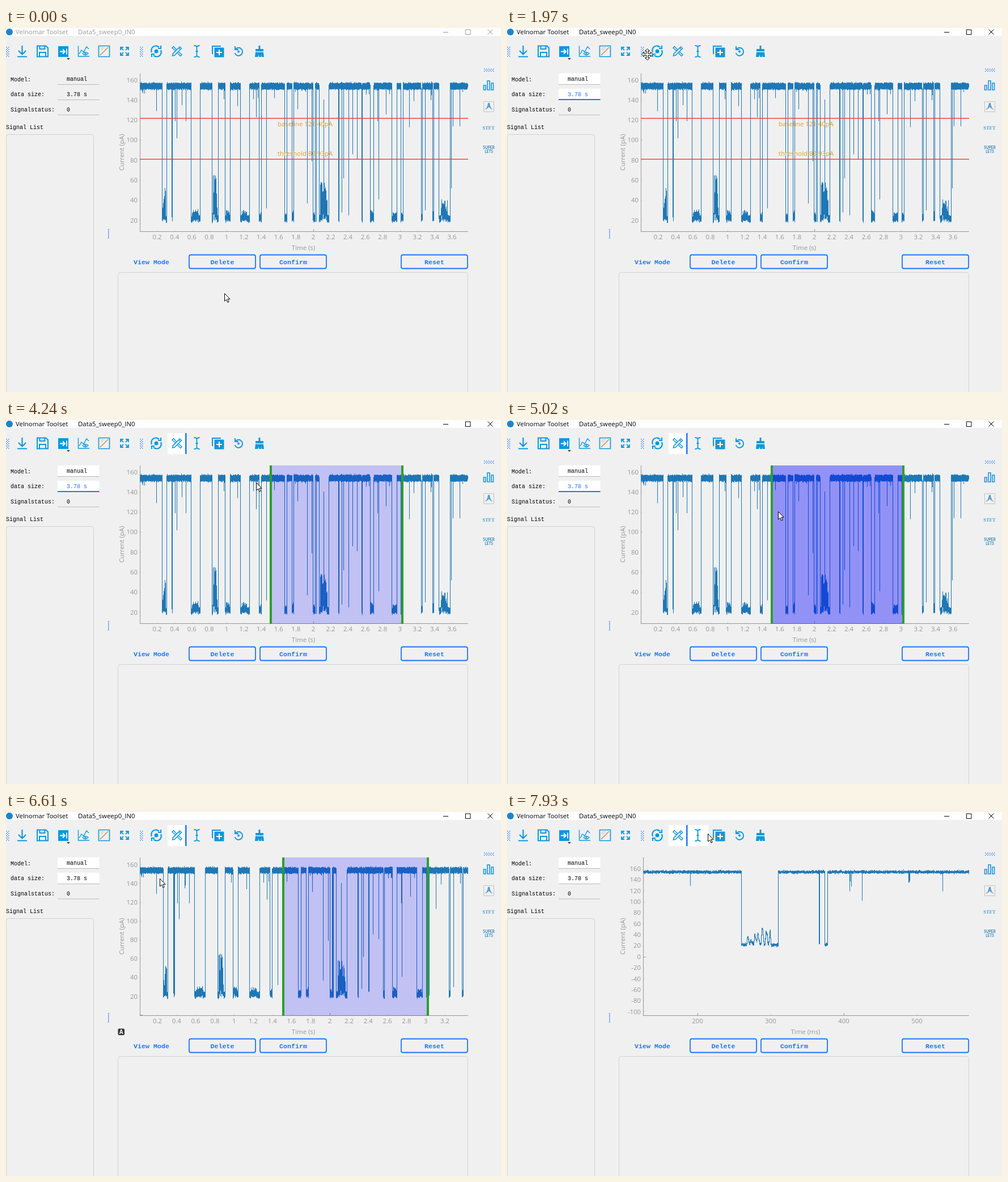
Write an HTML page with a canvas that moves like this. It is 873x641 px and loops after 8 s.

```html
<!DOCTYPE html>
<html lang="en">
<head>
<meta charset="utf-8">
<title>Signal viewer</title>
<style>
html, body { margin: 0; width: 100%; height: 100%; overflow: hidden; background: #f0f0f0; }
canvas { display: block; }
</style>
</head>
<body>
<canvas id="stage" width="873" height="641"></canvas>
<script>
const ctx = document.getElementById('stage').getContext('2d');
const LOOP = 8000, TOP = 80, BOTTOM = 359, RIGHT = 815;
const BLUE = '#1296db', ACCENT = '#1f74f8', GREY = '#969696', TRACE = '#1f77b4';
const SANS = '11.4px "Open Sans", sans-serif';
const MONO = '10px "Liberation Mono", monospace';
const BOLD = 'bold 11.67px "Liberation Mono", monospace';

// ---- signal -------------------------------------------------------------
let seed = 7;
const rand = () => (seed = (seed * 16807) % 2147483647) / 2147483647;
const noise = () => (rand() + rand() + rand() + rand() - 2) * 2.35;
const RATE = 10000, COUNT = 37800;
// closed states: start s, end s, height of bumps
const lows = [
  [.26, .31, 31], [.374, .3775, 3], [.59, .697, 8], [.832, .906, 45], [.987, 1.043, 7],
  [1.161, 1.268, 5], [1.377, 1.4, 5], [1.67, 1.697, 4], [1.756, 1.777, 8], [2, 2.023, 5],
  [2.034, 2.039, 5], [2.067, 2.182, 39], [2.292, 2.299, 3], [2.558, 2.568, 3], [2.655, 2.7, 8],
  [2.908, 2.968, 5], [3.01, 3.035, 4], [3.243, 3.257, 3], [3.378, 3.39, 8], [3.452, 3.577, 18]
];
// short events: time s, depth pA
const spikes = [
  [.19, 129], [.3665, 23], [.408, 119], [.409, 137], [.4105, 128], [.425, 102], [.489, 135],
  [.49, 138], [.535, 119], [.97, 141], [1.13, 134], [1.31, 141], [1.342, 123], [1.365, 142],
  [1.46, 32], [1.55, 142], [1.82, 131], [1.933, 37], [1.981, 79], [2.12, 140], [2.333, 28],
  [2.35, 62], [2.407, 25], [2.454, 86], [2.508, 81], [2.745, 119], [2.753, 41], [2.84, 126],
  [3.11, 113], [3.16, 139], [3.291, 30], [3.36, 140], [3.592, 52], [3.615, 114], [3.688, 114]
];
const signal = Float32Array.from({ length: COUNT }, () =>
  153.7 + noise() - (rand() < .0006 ? 9 * rand() : 0));
for (const [a, b, h] of lows) {
  const from = Math.round(a * RATE), to = Math.round(b * RATE);
  let p = 0, q = 0;
  for (let i = from; i < to; i++) {
    const k = (i - from) % 14, f = (i - from) / (to - from);
    if (!k) { p = q; q = f > .13 && f < .78 ? rand() ** 2 : 0; }
    signal[i] = 21.3 + noise() + h * (p + (q - p) * k / 14);
  }
}
for (const [s, v] of spikes) signal.fill(v, Math.round(s * RATE), Math.round(s * RATE) + 2);

// ---- timeline -----------------------------------------------------------
const run = (start, n) => Array.from({ length: n }, (_, i) => start + 120 * i);
const ticks = [0, ...run(430, 7), 1300, 1450, ...run(1700, 2), 1970, ...run(2120, 2), 2640, 2790,
  3040, 3320, 3720, ...run(4000, 6), 4750, ...run(4900, 3), ...run(5290, 2), ...run(5560, 3),
  ...run(5950, 2), 6220, ...run(6370, 3), ...run(6760, 3), ...run(7150, 2), ...run(7420, 2),
  ...run(7690, 3)];

// time, x, y of the pointer
const pointer = [
  [0, 385, 467], [430, 372, 440], [910, 142, 118], [1030, 138, 85], [1150, 133, 38], [1450, 133, 38],
  [1700, 186, 41], [1820, 239, 48], [1970, 247, 46], [2120, 259, 40], [2240, 267, 44], [2640, 271, 44],
  [2790, 294, 44], [3320, 294, 44], [3720, 318, 77], [4000, 370, 90], [4120, 425, 106], [4240, 441, 110],
  [4360, 441, 110], [4600, 383, 95], [4750, 494, 172], [4900, 482, 165], [5140, 473, 157],
  [5410, 480, 152], [5560, 450, 160], [5800, 397, 173], [5950, 335, 146], [6070, 282, 124],
  [6220, 270, 117], [6610, 271, 117], [7000, 336, 135], [7270, 356, 137], [7540, 470, 138],
  [7690, 440, 102], [7930, 354, 38]
];
// time, px per s, x of 0.2 s, px per pA, y of 160 pA
const zoom = [
  [0, 152.94, 266.6, 1.764, 91.3], [6490, 152.94, 266.6, 1.764, 91.3], [6610, 169, 267, 1.657, 92.3],
  [7000, 808.3, 302.5, .9896, 99.5], [7270, 1290, 336, .9692, 99.5]
];
const mix = (a, b, f) => a + (b - a) * f;
function between(keys, t) {
  const i = Math.max(0, keys.findLastIndex(k => k[0] <= t));
  const a = keys[i], b = keys[Math.min(i + 1, keys.length - 1)];
  return [a, b, a === b ? 0 : (t - a[0]) / (b[0] - a[0])];
}
function viewAt(t) {
  const [a, b, f] = between(zoom, t);
  const sx = a[1] * (b[1] / a[1]) ** f;
  const g = b[1] === a[1] ? 0 : (sx - a[1]) / (b[1] - a[1]);
  const sy = mix(a[3], b[3], f), y160 = mix(a[4], b[4], f);
  const x0 = mix(a[2], b[2], g) - .2 * sx;
  return { left: t >= 7270 ? 240 : 236, sx, sy, X: s => x0 + s * sx, Y: v => y160 + (160 - v) * sy,
    time: x => (x - x0) / sx, value: y => 160 - (y - y160) / sy };
}

// ---- drawing helpers ----------------------------------------------------
function box(x, y, w, h, fill) { ctx.fillStyle = fill; ctx.fillRect(x, y, w, h); }
function text(str, x, y, font, color, align = 'left', base = 'alphabetic') {
  Object.assign(ctx, { font, fillStyle: color, textAlign: align, textBaseline: base });
  ctx.fillText(str, x, y);
}
function shape(x, y, d, stroke, width = 1.8, fill) {
  const path = new Path2D(d);
  ctx.save();
  ctx.translate(x, y);
  if (fill) { ctx.fillStyle = fill; ctx.fill(path); }
  if (stroke) { ctx.strokeStyle = stroke; ctx.lineWidth = width; ctx.stroke(path); }
  ctx.restore();
}
function frame(x, y, w, h, color, width, r) {
  ctx.beginPath();
  ctx.roundRect(x, y, w, h, r);
  ctx.strokeStyle = color;
  ctx.lineWidth = width;
  ctx.stroke();
}
function dots(x, y, cols, rows) {
  for (let r = 0; r < rows; r++) for (let c = 0; c < cols; c++)
    if ((r + c) % 2 === 0) box(x + c * 2, y + r * 2, 1.5, 1.5, '#3f8cf0');
}

// ---- window -------------------------------------------------------------
function titleBar(active) {
  const ink = active ? '#000' : '#999';
  box(0, 0, 873, 14, '#fff');
  shape(6, 7, 'M-6 0A6 6 0 1 0 6 0A6 6 0 1 0-6 0Z', null, 0, '#1b86cf');
  text('Velnomar Toolset', 17, 11, SANS, ink);
  text('Data5_sweep0_IN0', 127, 11, SANS, ink);
  shape(775.5, 7.5, 'M-4.5 0H4.5', ink, 1);
  shape(814.5, 7.5, 'M-4-4.5H4.5V4H-4Z', ink, 1);
  shape(854, 7, 'M-4.5-4.5L4.5 4.5M4.5-4.5L-4.5 4.5', ink, 1);
}
function toolbar(picked, hover) {
  if (picked) { box(285, 23, 31, 37, '#fff'); box(316, 23, 2.5, 37, ACCENT); }
  if (hover) box(319, 23, 36, 37, '#fff');
  dots(0, 33, 3, 9);
  dots(236, 33, 3, 9);
  const icon = (x, d, w) => shape(x, 41, d, BLUE, w);
  icon(28.5, 'M0-10V5M-6.5-1L0 5.5L6.5-1M-8.5 9.5H8.5', 2.2);
  icon(64.5, 'M-9.5-9.5H6L9.5-6V9.5H-9.5ZM-5-9V-4H4V-9M-5.5 9V2H5.5V9', 2);
  box(92, 32, 18, 19, BLUE);
  shape(101, 41.5, 'M-6 0H3M-1-4L3 0L-1 4M6-5V5', '#fff', 1.8);
  shape(110, 53, 'M-3 0H3L0 3Z', null, 0, '#333');
  icon(137, 'M-9.5-9.5V9H10M-8 5L-4-2L0 1L5-8L9-4', 1.4);
  icon(137, 'M-2 4Q3-1 8 4Q3 9-2 4M2 4A1 1 0 1 0 4 4A1 1 0 1 0 2 4', 1.2);
  icon(173, 'M-9.5-9.5H9.5V9.5H-9.5Z', 1.6);
  shape(173, 41, 'M-7 7L7-7', '#c8874a', 1.5);
  shape(173, 41, 'M-6-6H1M-6-3H-2', '#bbb', 1);
  icon(209, 'M-7-2V-7H-2M2-7H7V-2M7 2V7H2M-2 7H-7V2M-7-7L-2-2M7-7L2-2M7 7L2 2M-7 7L-2 2', 1.8);
  icon(265, 'M-8 2A8 8 0 0 1 5-7M8-2A8 8 0 0 1-5 7M8-10V-5H3M-8 10V5H-3', 2.2);
  shape(265, 41, 'M-3.5 0A3.5 3.5 0 1 0 3.5 0A3.5 3.5 0 1 0-3.5 0', null, 0, BLUE);
  icon(301.5, 'M-8 8L-7 4L5-8L8-5L-4 7ZM-3-1L-8.5-6L-6-8.5L-1-3M3 1L8.5 6L6 8.5L1 3M3-6L6-3', 1.5);
  icon(336.5, 'M-5-10Q0-10 0-7Q0-10 5-10M0-7V7M-5 10Q0 10 0 7Q0 10 5 10M-2 0H2', 1.8);
  icon(374, 'M-10 5V-9H5', 2);
  shape(376, 43, 'M-8-8H8V8H-8Z', BLUE, 1, BLUE);
  shape(376, 43, 'M-5 0H5M0-5V5', '#fff', 2);
  icon(410, 'M-5-4A7 7 0 1 1-6.5 3M-6-9V-3H0', 1.9);
  shape(410, 41.5, 'M-2 0A2 2 0 1 0 2 0A2 2 0 1 0-2 0', null, 0, BLUE);
  shape(447, 41, 'M-1.5-10H1.5V-4H7V0H-7V-4H-1.5ZM-7 1.5H7L8 10H4L3 6V10H-1L-1.5 6L-3 10H-8Z', null, 0, BLUE);
}
function sidePanels(t) {
  const focus = t >= 1300 && t < 6370;
  const field = (y, str, lit, on) => {
    if (lit) box(91, y - 19, 73.5, 19, '#fff');
    box(91, y, 73.5, 1, '#bbb');
    if (on) box(91, y - 1, 73.5, 2, ACCENT);
    text(str, 107, y - 6, MONO, on ? ACCENT : '#000');
  };
  text('Model:', 8, 93.5, MONO, '#000');
  text('data size:', 8, 120, MONO, '#000');
  text('Signalstatus:', 8, 147, MONO, '#000');
  text('Signal List', 0, 178, MONO, '#000');
  field(99, 'manual', t >= 1030);
  field(126, '3.78 s', t >= 910, focus);
  field(152.5, '0');
  frame(.5, 187.5, 154, 480, '#d2d2d2', 1, 4);
  frame(197.5, 430.5, 617, 240, '#d2d2d2', 1, 4);
  for (let y = 354; y < 370; y += 3) box(180, y, 1.6, 1.6, ACCENT);

  const button = (x, str) => {
    frame(x + 1, 399.5, 117, 24, ACCENT, 1.8, 3);
    text(str, x + 59.5, 415.5, BOLD, ACCENT, 'center');
  };
  text('View Mode', 256.5, 415.5, BOLD, ACCENT, 'center');
  button(322, 'Delete');
  button(447, 'Confirm');
  button(696, 'Reset');

  dots(843, 71.5, 9, 3);
  shape(851, 101, 'M-8.5 0H-5V8H-8.5ZM-2-8H2V8H-2ZM5-4H8.5V8H5Z', BLUE, 1.6);
  frame(842.5, 129.5, 18, 18, '#c4c4c4', 1, 0);
  shape(851.5, 139, 'M-8 5Q-2 2-1.5-7H1.5Q2 2 8 5Q3 4 0 0Q-3 4-8 5Z', null, 0, '#5b9cc4');
  text('STFT', 851, 179, 'bold 8.5px "Liberation Serif", serif', '#4b9fd3', 'center');
  text('SUPER', 851.5, 213, 'bold 6.5px Lato, sans-serif', '#2a86c0', 'center');
  text('LETS', 851.5, 220, 'bold 6.5px Lato, sans-serif', '#2a86c0', 'center');
}

// ---- plot ---------------------------------------------------------------
function tickLevels(min, max, size) {
  const range = max - min, best = range / Math.log(size);
  const unit = 10 ** Math.floor(Math.log10(best));
  const steps = [1, 2, 10, 20, 100].map(k => k * unit);
  let m = 0;
  while (steps[m + 1] <= best) m++;
  const levels = [steps[m + 2], steps[m + 1]];
  if (range / steps[m] <= 20) levels.push(steps[m]);
  const used = new Set();
  return levels.map((step, i) => {
    const list = [];
    for (let k = Math.ceil(min / step); k * step <= max; k++) {
      const key = Math.round(k * step / unit);
      if (!used.has(key)) { used.add(key); list.push(k * step); }
    }
    const alpha = Math.min(1, .05 * size / (list.length + 1)) / (i + 1);
    return { step, list, alpha, length: 5 / (i * .5 + 1) };
  });
}
function axes(v, t) {
  const { left } = v, end = v.time(RIGHT), milli = end < 1;
  box(left, TOP, 1, BOTTOM - TOP, GREY);
  box(left, BOTTOM - 1, RIGHT - left, 1, GREY);
  for (const l of tickLevels(v.value(BOTTOM), v.value(TOP), BOTTOM - TOP))
    for (const n of l.list) {
      const y = v.Y(n);
      ctx.globalAlpha = l.alpha;
      box(left, Math.round(y), l.length, 1, GREY);
      ctx.globalAlpha = 1;
      if (y > TOP + 7 && y < BOTTOM - 7) text(n.toFixed(0), left - 4, y + 4.3, SANS, GREY, 'right');
    }
  for (const l of tickLevels(v.time(left), end, RIGHT - left))
    for (const n of l.list) {
      const x = v.X(n), step = milli ? l.step * 1000 : l.step;
      const str = (milli ? n * 1000 : n).toFixed(Math.max(0, Math.ceil(-Math.log10(step) - 1e-9)));
      ctx.globalAlpha = l.alpha;
      box(Math.round(x), BOTTOM - l.length, 1, l.length, GREY);
      ctx.globalAlpha = 1;
      const half = str.length * 2.9;
      if (x - half > left && x + half < RIGHT) text(str, x, 372, SANS, GREY, 'center');
    }
  text(milli ? 'Time (ms)' : 'Time (s)', milli ? (left > 236 ? 526.5 : 529) : 524.5, 391, SANS, GREY, 'center');
  ctx.save();
  ctx.translate(208, 219);
  ctx.rotate(-Math.PI / 2);
  text('Current (pA)', 0, 0, SANS, GREY, 'center');
  ctx.restore();
}
function trace(v) {
  for (let x = v.left; x < RIGHT; x++) {
    const from = Math.max(0, Math.floor(v.time(x) * RATE) - 1);
    const to = Math.min(COUNT, Math.floor(v.time(x + 1) * RATE));
    let lo = 1e9, hi = -1e9;
    for (let i = from; i < to; i++) {
      if (signal[i] < lo) lo = signal[i];
      if (signal[i] > hi) hi = signal[i];
    }
    if (hi >= lo) box(x, v.Y(hi) - .5, 1, v.Y(lo) - v.Y(hi) + 1, TRACE);
  }
}
function plot(t) {
  const v = viewAt(t);
  axes(v, t);
  ctx.save();
  ctx.beginPath();
  ctx.rect(v.left, TOP, RIGHT - v.left, BOTTOM - TOP);
  ctx.clip();
  trace(v);
  if (t < 3320) {
    const level = (name, value, y) => {
      box(v.left, Math.round(v.Y(value)) - .6, RIGHT, 1.4, '#f8392f');
      text(`${name} ${value.toFixed(2)}pA`, 479, y, SANS, '#daa520');
    };
    level('baseline', 121.4, 173);
    level('threshold', 80.93, 225);
  } else {
    const a = v.X(1.512), b = v.X(3.024), hover = t >= 4750 && t < 5560;
    box(a, TOP, b - a, BOTTOM - TOP, `rgba(0,0,255,${hover ? .392 : .196})`);
    for (const x of [a, b]) box(Math.round(x) - 2, TOP, 4, BOTTOM - TOP, '#2ca02c');
  }
  ctx.restore();
  if (t >= 6370 && t < 7810) {
    ctx.beginPath();
    ctx.roundRect(197.5, 381.5, 11.5, 11.5, 2);
    ctx.fillStyle = '#333';
    ctx.fill();
    text('A', 203.2, 391, 'bold 10px "Open Sans", sans-serif', '#fff', 'center');
  }
}
function cursor(t) {
  const [a, b, f] = between(pointer, t);
  const x = Math.round(mix(a[1], b[1], f)) + .5, y = Math.round(mix(a[2], b[2], f)) + .5;
  const move = t >= 1820 && t < 2120;
  shape(x, y, move
    ? 'M0-10L4-6H1.5V-1.5H6V-4L10 0L6 4V1.5H1.5V6H4L0 10L-4 6H-1.5V1.5H-6V4L-10 0L-6-4V-1.5H-1.5V-6H-4Z'
    : 'M0 0V13.5L3.2 10.6L5.4 15.7L7.6 14.7L5.4 9.8H9.6Z', '#000', 1, '#fff');
}

function draw() {
  const now = performance.now() % LOOP;
  const t = ticks.findLast(k => k <= now);
  box(0, 0, 873, 641, '#f0f0f0');
  titleBar(t >= 910);
  toolbar(t >= 3320, t >= 7930);
  sidePanels(t);
  plot(t);
  cursor(t);
  requestAnimationFrame(draw);
}
draw();
</script>
</body>
</html>
```
